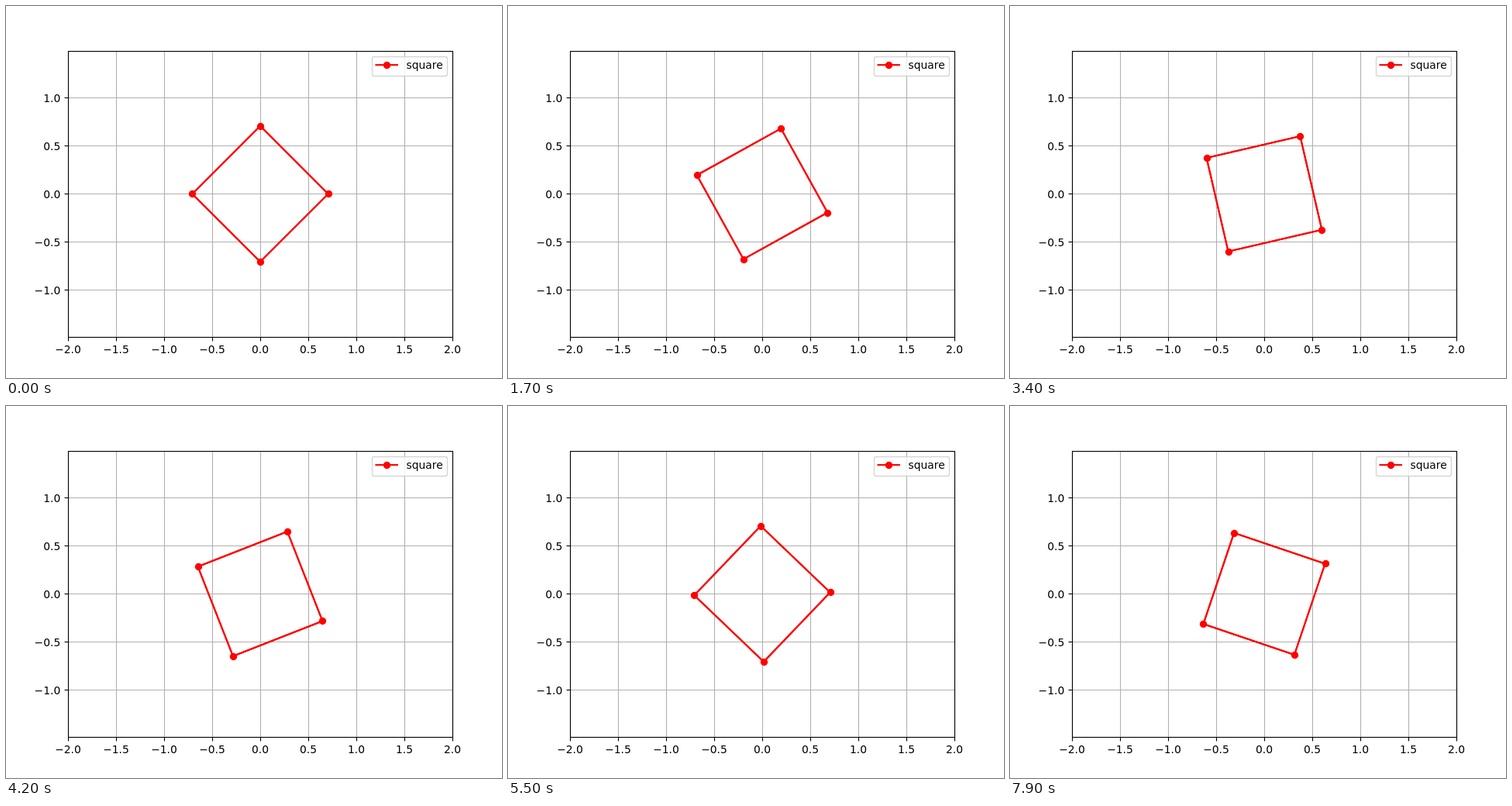
An HTML page with a canvas that plays this animation: 640x480 px, repeating every 8 s.

```html
<!DOCTYPE html>
<html lang="en">
<head>
<meta charset="utf-8">
<title>Rotating square</title>
<style>
  html, body { margin: 0; width: 100%; height: 100%; overflow: hidden; background: #fff; }
  canvas { display: block; }
</style>
</head>
<body>
<canvas id="stage" width="640" height="480"></canvas>
<script>
const ctx = document.getElementById('stage').getContext('2d');
const PT = 100 / 72;                       // pixels per point
const UNIT = 124, CX = 328, CY = 242.4;    // data scale and origin
const LEFT = 80.5, RIGHT = 576.5, TOP = 58.5, BOTTOM = 427.5;
const STEP = 100, STEPS = 80;              // the square turns 1 radian per step

const snap = v => Math.floor(v + 0.5) + 0.5;
const px = x => CX + x * UNIT;
const py = y => CY - y * UNIT;
const label = v => v.toFixed(1).replace('-', '\u2212');
const range = (from, to) => Array.from({ length: (to - from) * 2 + 1 }, (_, i) => from + i / 2);

function line(x1, y1, x2, y2, color, width) {
  ctx.strokeStyle = color;
  ctx.lineWidth = width;
  ctx.beginPath();
  ctx.moveTo(x1, y1);
  ctx.lineTo(x2, y2);
  ctx.stroke();
}

function text(str, x, y, align) {
  ctx.fillStyle = '#000';
  ctx.textAlign = align;
  ctx.fillText(str, x, y);
}

function marker(x, y) {
  ctx.fillStyle = '#f00';
  ctx.beginPath();
  ctx.arc(snap(x), snap(y), 4 + PT / 2, 0, 2 * Math.PI);
  ctx.fill();
}

function drawAxes() {
  const thin = 0.8 * PT;
  const xs = range(-2, 2), ys = range(-1, 1);
  ctx.lineCap = 'butt';
  for (const v of xs) line(snap(px(v)), TOP, snap(px(v)), BOTTOM, '#b0b0b0', thin);
  for (const v of ys) line(LEFT, snap(py(v)), RIGHT, snap(py(v)), '#b0b0b0', thin);
  for (const v of xs) {
    line(snap(px(v)), BOTTOM, snap(px(v)), BOTTOM + 5, '#000', thin);
    text(label(v), px(v), 448, 'center');
  }
  for (const v of ys) {
    line(LEFT - 5, snap(py(v)), LEFT, snap(py(v)), '#000', thin);
    text(label(v), 70.3, Math.round(py(v) + 5.2), 'right');
  }
}

function drawFrame() {
  ctx.strokeStyle = '#000';
  ctx.lineWidth = 0.8 * PT;
  ctx.strokeRect(LEFT, TOP, RIGHT - LEFT, BOTTOM - TOP);
}

function drawSquare(angle) {
  const corners = [0, 1, 2, 3].map(i => {
    const a = angle + i * Math.PI / 2;
    return [px(Math.SQRT1_2 * Math.cos(a)), py(Math.SQRT1_2 * Math.sin(a))];
  });
  ctx.strokeStyle = '#f00';
  ctx.lineWidth = 1.5 * PT;
  ctx.lineJoin = 'round';
  ctx.beginPath();
  corners.forEach(([x, y]) => ctx.lineTo(x, y));
  ctx.closePath();
  ctx.stroke();
  ctx.stroke();                            // second pass firms up the edges
  corners.forEach(([x, y]) => marker(x, y));
  ctx.lineJoin = 'miter';
}

function drawLegend() {
  ctx.beginPath();
  ctx.roundRect(472.5, 65.5, 97, 25, 2.8);
  ctx.fillStyle = 'rgba(255,255,255,0.8)';
  ctx.fill();
  ctx.strokeStyle = 'rgba(204,204,204,0.8)';
  ctx.lineWidth = PT;
  ctx.stroke();
  ctx.lineCap = 'square';
  line(477.5, 76, 505, 76, '#f00', 1.5 * PT);
  marker(491, 76);
  text('square', 516.4, 81, 'left');
}

function draw(now) {
  const step = Math.floor(now / STEP) % STEPS;
  ctx.fillStyle = '#fff';
  ctx.fillRect(0, 0, 640, 480);
  ctx.font = 10 * PT + 'px "DejaVu Sans", sans-serif';
  drawAxes();
  drawSquare(step);
  drawFrame();
  drawLegend();
}

const start = performance.now();
function tick() {
  draw(performance.now() - start);
  requestAnimationFrame(tick);
}
tick();
</script>
</body>
</html>
```
